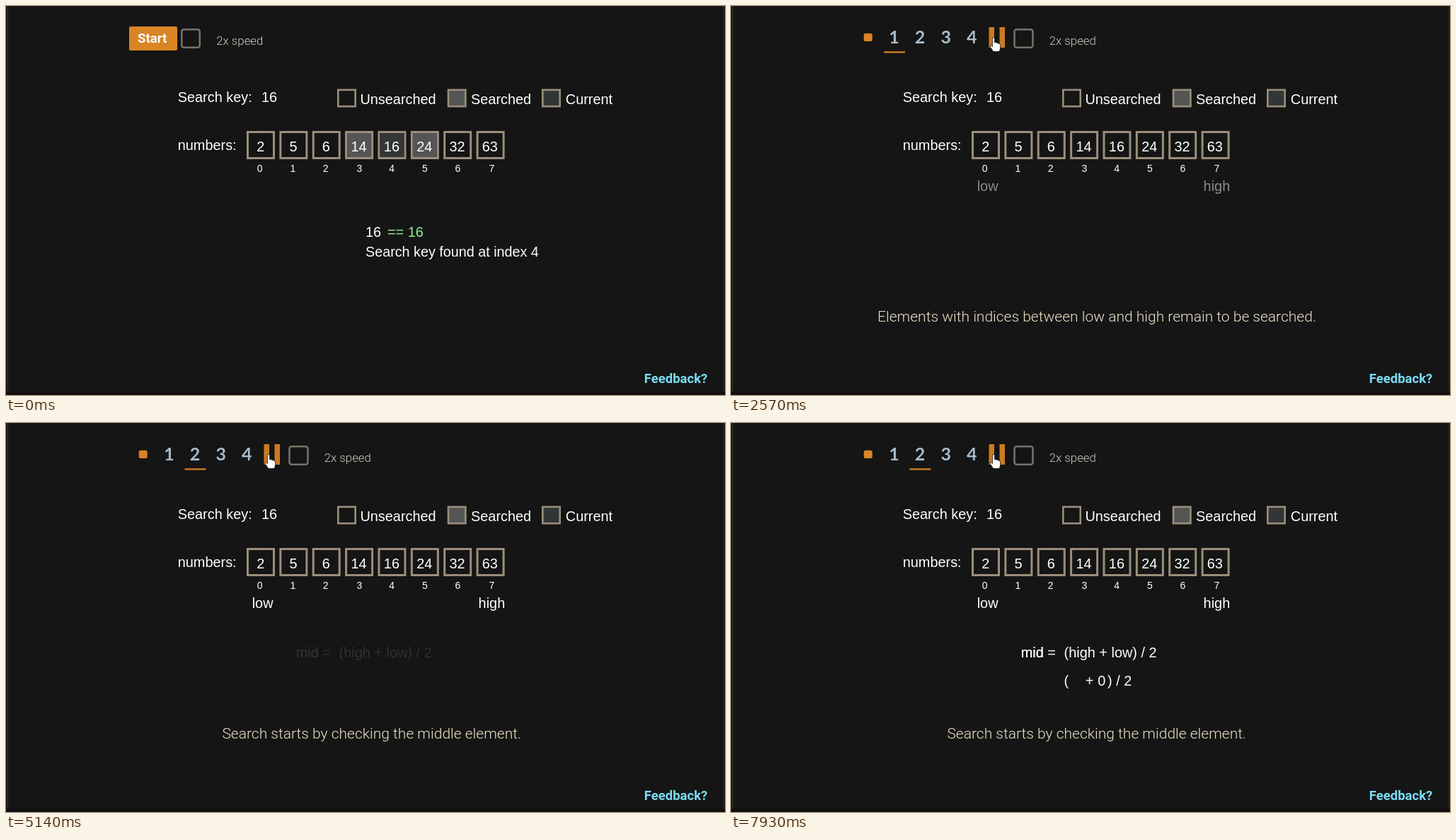
Recreate the animation shown at these times as an HTML page. Size 1016 px wide and 551 px high, loop 8000 ms.

```html
<!DOCTYPE html>
<html lang="en">
<head>
<meta charset="utf-8">
<title>Binary search</title>
<style>
  html, body { margin: 0; width: 100%; height: 100%; overflow: hidden; background: #151515; }
  svg { display: block; width: 1016px; height: 551px; }
  text { font: 19.9px "Liberation Sans", Arial, sans-serif; fill: #fff; white-space: pre; }
  .mid { text-anchor: middle; }
  .index { font-size: 14px; }
  .equal { fill: #90ee90; }
  .found { font-size: 19.75px; }
  .speed, .caption { font-family: Roboto, sans-serif; font-weight: 300; }
  .speed { font-size: 16.8px; fill: #d3cdc0; }
  .caption { font-size: 21px; fill: #ece3c6; }
  .start, .feedback { font: bold 18.6px Roboto, sans-serif; }
  .feedback { font-size: 18.5px; fill: #7adcf5; }
  .step { font: bold 25px Lato, sans-serif; fill: #a7bccb; }
  .cell { stroke: #9b8e7b; stroke-width: 3; }
  .check { fill: none; stroke: #7b7269; stroke-width: 2.5; }
</style>
</head>
<body>
<svg id="stage" viewBox="0 0 1016 551"></svg>
<script>
const stage = document.getElementById('stage');
const LOOP = 8000, TICK = 77;
const EMPTY = '#151515', SEARCHED = '#545656', CURRENT = '#333636', ORANGE = '#cc7b21';

function add(parent, tag, attrs, content) {
  const el = document.createElementNS('http://www.w3.org/2000/svg', tag);
  for (const key in attrs) el.setAttribute(key, attrs[key]);
  if (content !== undefined) el.textContent = content;
  return parent.appendChild(el);
}
const group = () => add(stage, 'g', {});
const text = (parent, x, y, content, cls = '') => add(parent, 'text', { x, y, class: cls }, content);
const rect = (parent, x, y, width, height, fill, more = {}) =>
  add(parent, 'rect', { x, y, width, height, fill, ...more });

// Frame of the page
rect(stage, 2, 0, 1, 546, '#343434');
rect(stage, 1014, 0, 1, 546, '#2b2b2b');
rect(stage, 0, 546, 1016, 5, '#120f10');
text(stage, 901.8, 534, 'Feedback?', 'feedback');

// Controls before the start
const idle = group();
rect(idle, 174, 29, 68, 34, '#da8425', { rx: 2 });
text(idle, 206.7, 52, 'Start', 'start mid');
rect(idle, 248.3, 33.3, 25.5, 25.5, 'none', { rx: 3, class: 'check' });
text(idle, 297.3, 55, '2x speed', 'speed');

// Controls while running
const running = group();
rect(running, 187.7, 38.8, 12, 11.2, '#d98425', { rx: 2.5 });
for (let i = 0; i < 4; i++) text(running, 230.5 + 36.6 * i, 53, i + 1, 'step mid');
const underline = rect(running, 216, 64.2, 30, 2.4, ORANGE);
const pause = add(running, 'path', { d: 'M364.5 30h7.5v29h-7.5zM379.5 30h7.5v29h-7.5z', fill: ORANGE });
const play = add(running, 'path', { d: 'M365 30L387 44.5L365 59z', fill: ORANGE });
rect(running, 400.5, 33.3, 26, 25.5, 'none', { rx: 3, class: 'check' });
text(running, 449.8, 55, '2x speed', 'speed');

// Key and legend
text(stage, 242.7, 136, 'Search key:');
text(stage, 361, 136, '16');
[[469.3, EMPTY, 500.4, 'Unsearched'], [625, SEARCHED, 657, 'Searched'], [758.3, CURRENT, 790.8, 'Current']]
  .forEach(([x, fill, labelX, label]) => {
    rect(stage, x, 118.8, 24.4, 23.4, fill, { class: 'cell', style: 'stroke-width:2.6' });
    text(stage, labelX, 138.5, label);
  });

// Array
text(stage, 242.7, 204, 'numbers:');
const fills = [];
const marks = { 3: SEARCHED, 4: CURRENT, 5: SEARCHED };
const indexX = [358.7, 405.5, 451.7, 499.5, 545.2, 592, 638.5, 686.5];
[2, 5, 6, 14, 16, 24, 32, 63].forEach((n, i) => {
  const x = 341.5 + 46.37 * i;
  rect(stage, x, 178.5, 37, 37, EMPTY, { class: 'cell' });
  if (marks[i]) fills.push(rect(stage, x + 1.5, 180, 34, 34, marks[i]));
  text(stage, 359.7 + 46.3 * i, 205.7, n, 'mid');
  text(stage, indexX[i], 235, i, 'index mid');
});

// Outcome of the previous run
const outcome = group();
text(outcome, 508, 327, '16');
text(outcome, 539, 327, '==', 'equal');
text(outcome, 567.8, 327, '16', 'equal');
text(outcome, 508, 355, 'Search key found at index 4', 'found');

const bounds = group();
text(bounds, 347.7, 262, 'low');
text(bounds, 667.6, 262, 'high');

// "mid" is set twice, which makes it slightly heavier
const formula = group();
text(formula, 409.7, 332, 'mid');
text(formula, 409.7, 332, 'mid =');
text(formula, 470.6, 332, '(high + low) / 2');

const values = group();
text(values, 470.6, 372, '(');
text(values, 500.8, 372, '+');
text(values, 532, 372, ') / 2');
const zero = text(stage, 0, 0, '0', 'mid');

const caption1 = text(stage, 517, 447, 'Elements with indices between low and high remain to be searched.', 'caption mid');
const caption2 = text(stage, 516.7, 447, 'Search starts by checking the middle element.', 'caption mid');

const hand = add(stage, 'path', {
  d: 'M-1.6 1.6a1.6 1.6 0 0 1 3.2 0v5.6q2.8-.9 3.2.9q2.3-.7 2.8 1q2-.3 2 1.7v3.6q0 2.2-1.5 5.6h-8.4l-4.2-6.3q-1-2.6 1-2.3l1.9 1.7z',
  fill: '#fff', stroke: '#111', 'stroke-width': 0.8
});

const clamp = v => Math.min(1, Math.max(0, v));
const mix = (a, b, p) => a + (b - a) * p;
const smooth = p => p * p * (3 - 2 * p);
const steps = (t, start, n) => clamp((Math.floor((t - start) / TICK) + 1) / n);
const fade = (el, v) => el.setAttribute('opacity', v);
const show = (el, on) => el.setAttribute('display', on ? 'inline' : 'none');

function moveHand(t) {
  let x, y;
  if (t < 1470) {
    const p = 1 - (1 - steps(t, 70, 11)) ** 2;
    x = mix(240, 199, p);
    y = mix(-22, 43, p);
  } else {
    const p = smooth(steps(t, 1470, 9));
    x = mix(199, 371, p);
    y = mix(43, 44.5, p) - 84 * p * (1 - p);
  }
  hand.setAttribute('transform', `translate(${x} ${y})`);
}

function draw(t) {
  const started = t >= 920;
  const waiting = t >= 3040 && t < 3990;
  show(idle, !started);
  show(running, started);
  show(pause, !waiting);
  show(play, waiting);
  underline.setAttribute('x', t < 3990 ? 216 : 252.4);

  const old = 1 - steps(t, 920, 4);
  [outcome, ...fills].forEach(el => fade(el, old));
  fade(caption1, steps(t, 1470, 4) - steps(t, 3990, 4));
  fade(bounds, steps(t, 2330, 8));
  fade(caption2, steps(t, 4298, 4));
  fade(formula, steps(t, 5140, 9));
  fade(values, steps(t, 6230, 8));

  show(zero, t >= 7090);
  const p = steps(t, 7240, 8);
  zero.setAttribute('x', mix(indexX[0], 523.9, p));
  zero.setAttribute('y', mix(235, 372, p));
  zero.style.fontSize = mix(14, 19.9, p) + 'px';
  moveHand(t);
}

const begin = performance.now();
function tick() {
  draw((performance.now() - begin) % LOOP);
  requestAnimationFrame(tick);
}
tick();
</script>
</body>
</html>
```
